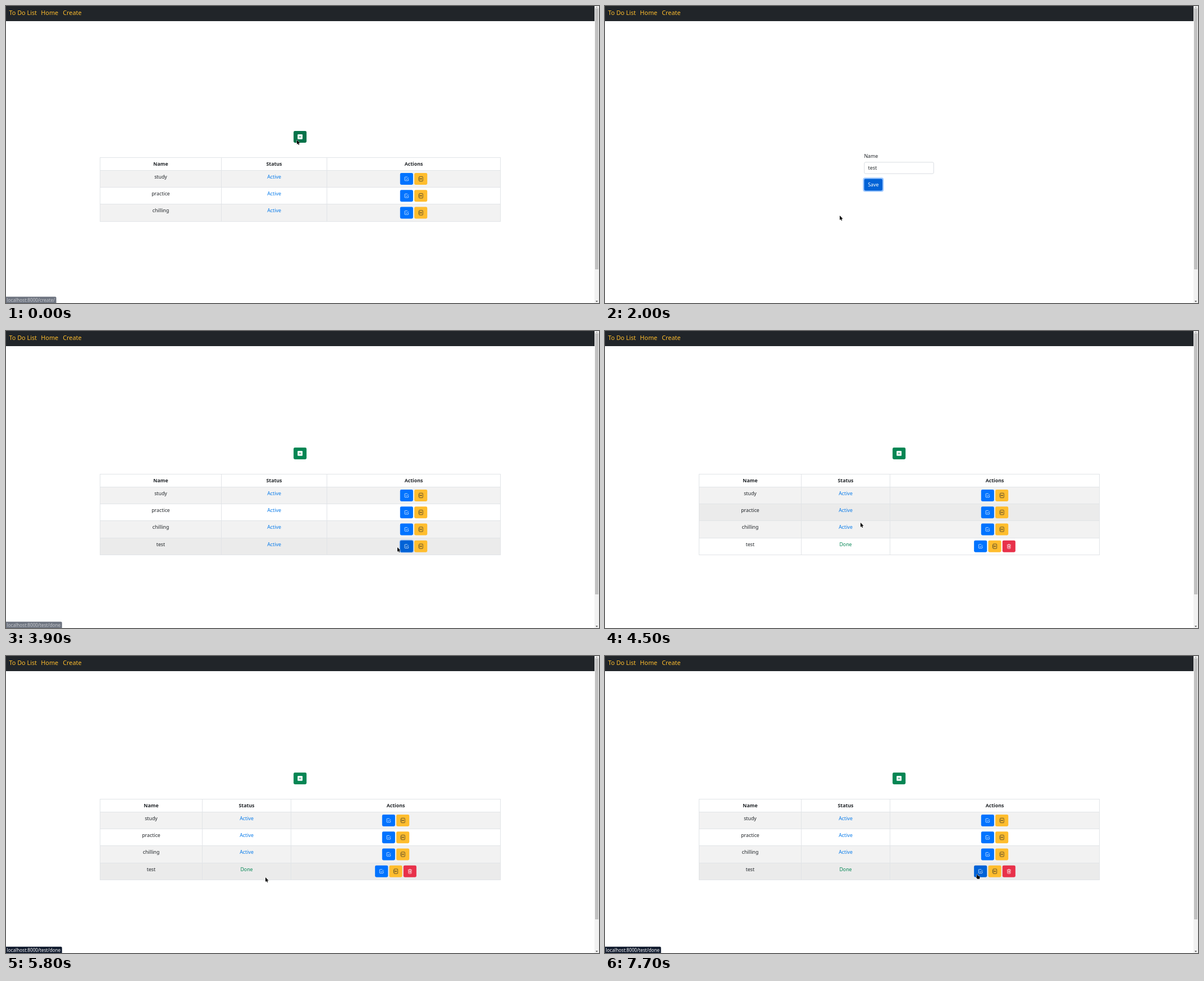
Recreate the animation shown at these times as an HTML page with a canvas. Size 1056 by 530 pixels, loop 8000 ms.

```html
<!DOCTYPE html>
<html lang="en">
<head>
<meta charset="utf-8">
<title>To Do List</title>
<style>
html, body { margin: 0; width: 100%; height: 100%; overflow: hidden; background: #fff; }
canvas { display: block; width: 1056px; height: 530px; }
</style>
</head>
<body>
<canvas id="stage" width="1056" height="530"></canvas>
<script>
const ctx = document.getElementById('stage').getContext('2d');
const LOOP = 8000;
const FONT = '"Noto Sans", "Open Sans", sans-serif';
const BLUE = '#0073ff', BLUE_DARK = '#0062d6', YELLOW = '#ffbd2e', YELLOW_DARK = '#ffca52';
const GREEN = '#048654', GREEN_DARK = '#05734a', RED = '#e8314a', INK = '#212529', LINE = '#e1e4e7';
const ROW = 30.25, BTN_W = 23.1, BTN_H = 20.9, PITCH = 25.3;

// pointer: time, x, y
const pointer = [
  [0, 518, 239], [200, 520, 234], [300, 521, 233], [500, 530, 215], [600, 538, 170],
  [700, 541, 138], [800, 541, 180], [900, 537, 240], [1000, 532, 284], [1200, 525, 340],
  [1300, 512, 418], [1500, 440, 392], [1600, 418, 374], [2300, 413, 359], [2400, 395, 355],
  [2500, 375, 351], [2800, 400, 372], [2900, 450, 384], [3000, 503, 380], [3200, 590, 376],
  [3300, 680, 374], [3500, 703, 380], [3600, 706, 384], [3700, 707, 385], [3900, 697, 386],
  [4100, 640, 370], [4200, 540, 330], [4300, 457, 312], [4500, 455, 342], [4700, 500, 372],
  [4800, 590, 385], [5000, 701, 390], [5200, 699, 391], [5400, 668, 389], [5600, 537, 388],
  [5800, 462, 395], [6000, 480, 390], [6100, 540, 383], [6200, 600, 380], [6300, 631, 393],
  [6600, 669, 387], [6800, 690, 384], [6900, 691, 386], [7100, 688, 386], [7300, 672, 388],
  [7400, 668, 389], [7500, 663, 388], [7700, 661, 389]
];

// link preview: time, opacity, path
const previews = [
  [0, .6, 'create/'], [200, 1, 'create/'], [600, .5, 'create/'], [700, 0, ''],
  [3900, .6, 'test/done'], [4100, 1, 'test/done'], [4200, .5, 'test/done'], [4300, 0, ''],
  [5000, .6, 'update/test'], [5200, 1, 'update/test'], [5400, 1, 'test/done'],
  [6000, .7, 'test/done'], [6100, .4, 'test/done'], [6200, 0, ''],
  [6800, .6, 'update/test'], [6900, 1, 'update/test'], [7300, 1, 'test/done']
];

const at = (list, t) => list.reduce((found, item) => item[0] <= t ? item : found);
const within = (t, a, b) => t >= a && t < b;

function rect(x, y, w, h, color) {
  ctx.fillStyle = color;
  ctx.fillRect(x, y, w, h);
}

function box(x, y, w, h, r, fill, stroke) {
  ctx.beginPath();
  ctx.roundRect(x, y, w, h, r);
  if (fill) { ctx.fillStyle = fill; ctx.fill(); }
  if (stroke) { ctx.strokeStyle = stroke; ctx.stroke(); }
}

function text(str, x, y, { size = 8.8, color = INK, align = 'left', weight = 400 } = {}) {
  ctx.font = `${weight} ${size}px ${FONT}`;
  ctx.textAlign = align;
  ctx.fillStyle = color;
  ctx.fillText(str, x, y);
}

// Icons live on a 16 unit grid
const icons = {
  plus() {
    box(0, 0, 16, 16, 2, '#fff');
    rect(7.4, 4, 1.2, 8, GREEN);
    rect(4, 7.4, 8, 1.2, GREEN);
  },
  check() {
    ctx.strokeStyle = '#fff';
    ctx.stroke(new Path2D('M11 2H3.2Q2 2 2 3.2V12.8Q2 14 3.2 14H12.8Q14 14 14 12.8V8M5 7.6L8 10.6L14.8 3.8'));
  },
  journal() {
    ctx.strokeStyle = INK;
    box(2.5, .5, 12, 15, 1.5, null, INK);
    ctx.stroke(new Path2D('M8.5 5V11M5.5 8H11.5M1 5H3.5M1 8H3.5M1 11H3.5'));
  },
  trash() {
    ctx.strokeStyle = '#fff';
    ctx.stroke(new Path2D('M1.5 3.5H14.5M5.5 3V1.5H10.5V3M3.2 4V14Q3.2 15.4 4.6 15.4H11.4Q12.8 15.4 12.8 14V4M5.7 6V12.8M8 6V12.8M10.3 6V12.8'));
  }
};

function button(x, y, color, icon) {
  box(x, y, BTN_W, BTN_H, 2.4, color);
  ctx.save();
  ctx.translate(x + BTN_W / 2 - 4.4, y + BTN_H / 2 - 4.4);
  ctx.scale(.55, .55);
  ctx.lineWidth = 1.25;
  icons[icon]();
  ctx.restore();
}

function ring(x, y, w, h, alpha) {
  box(x - 2.2, y - 2.2, w + 4.4, h + 4.4, 4, `rgba(20,120,255,${alpha})`);
}

function chrome() {
  rect(0, 0, 1048, 27, INK);
  const nav = { size: 10.85, color: '#fdbc2d' };
  text('To Do List', 5.5, 16.2, nav);
  text('Home', 62.3, 16.2, nav);
  text('Create', 101.2, 16.2, nav);
  rect(1048, 0, 8, 530, '#f1f1f1');
  rect(1049, 4, 6, 466, '#c1c1c1');
  ctx.fillStyle = '#a3a3a3';
  ctx.fill(new Path2D('M1050 3L1052 1L1054 3Z'));
  ctx.fillStyle = '#505050';
  ctx.fill(new Path2D('M1050 526L1054 526L1052 528.5Z'));
}

function listPage(t, py) {
  const names = ['study', 'practice', 'chilling'];
  if (t >= 2300) names.push('test');
  const done = t >= 4200;
  const top = names.length === 3 ? 270.4 : 255.4;
  const cols = done ? [167, 349, 507, 880] : [167, 383, 571, 880];
  const mid = [0, 1, 2].map(i => (cols[i] + cols[i + 1] + 1) / 2);
  const first = top + 22.9;
  const bottom = first + names.length * ROW;
  const hoverRow = t >= 4500 && t < 4700 ? 1 : Math.floor((py - first) / ROW);

  button(512.1, top - 47.4, t < 500 ? GREEN_DARK : GREEN, 'plus');
  ['Name', 'Status', 'Actions'].forEach((head, i) =>
    text(head, mid[i], top + 14.8, { align: 'center', weight: 700 }));

  names.forEach((name, i) => {
    const y = first + i * ROW;
    const shade = i === hoverRow ? '#ebebeb' : i % 2 ? '#fff' : '#f2f2f2';
    rect(167, y, 714, ROW, shade);
  });
  for (let i = 0; i <= names.length; i++)
    rect(167, Math.round(first + i * ROW - .4), 714, 1, LINE);
  rect(167, Math.floor(top), 714, 1, LINE);
  cols.forEach(x => rect(x, Math.floor(top), 1, bottom - Math.floor(top), LINE));

  names.forEach((name, i) => {
    const y = first + i * ROW;
    const last = i === 3, finished = last && done;
    text(name, mid[0], y + 14.5, { align: 'center' });
    text(finished ? 'Done' : 'Active', mid[1], y + 14.5,
      { align: 'center', color: finished ? GREEN : '#087bea' });
    const count = finished ? 3 : 2;
    const x = mid[2] - (BTN_W + (count - 1) * PITCH) / 2;
    const overCheck = last && (within(t, 3500, 4200) || within(t, 5400, 5600) || t >= 7300);
    const overEdit = last && (within(t, 5000, 5400) || within(t, 6800, 7300));
    if (last && within(t, 3900, 4200)) ring(x + 1, y + 5.7, BTN_W - 2, BTN_H - 2, .4);
    button(x, y + 4.7, overCheck ? BLUE_DARK : BLUE, 'check');
    button(x + PITCH, y + 4.7, overEdit ? YELLOW_DARK : YELLOW, 'journal');
    if (finished) button(x + 2 * PITCH, y + 4.7, RED, 'trash');
  });
}

function createPage(t) {
  const focused = within(t, 1100, 1900), saving = t >= 1900;
  const typed = 'test'.slice(0, Math.max(0, Math.floor((t - 1400) / 100)));
  text('Name', 461.4, 270.9);
  if (focused) ring(461.5, 278.5, 124, 20.9, t < 1200 ? .15 : .28);
  ctx.lineWidth = .8;
  box(461.8, 278.8, 123.5, 20.4, 2.2, '#fff', focused ? '#86b7fe' : '#ced4da');
  text(typed, 468.6, 292.2);
  if (focused) rect(469 + ctx.measureText(typed).width, 284.3, .6, 9.5, INK);
  if (saving) ring(461.5, 308.5, 32.6, 20.9, .42);
  box(461.5, 308.5, 32.6, 20.9, 2.4, saving ? BLUE_DARK : BLUE);
  text('Save', 477.8, 322.1, { color: '#fff', align: 'center' });
}

function preview(t) {
  const [, alpha, path] = at(previews, t);
  if (!alpha) return;
  const url = 'localhost:8000/' + path;
  ctx.globalAlpha = alpha;
  ctx.font = `8.2px ${FONT}`;
  const w = ctx.measureText(url).width + 4;
  box(-2, 518.8, w + 2, 13, 2, '#101a2d');
  text(url, 1.5, 527.6, { size: 8.2, color: '#fff' });
  ctx.globalAlpha = 1;
}

const arrow = new Path2D('M0 0V7.9L1.8 6.3L3 9.1L4.3 8.5L3.1 5.8H5.6Z');
const hand = new Path2D('M1.2 .5Q2.3 0 2.6 1.2V3.2L5.6 3.8Q6.6 4.2 6.5 5.3L6 8.8H2L.2 6.2Q-.2 5.2 .9 5.3Z');
const beam = new Path2D('M0 0H1.4M2.2 0H3.6M1.8 .3V8.2M0 8.5H1.4M2.2 8.5H3.6');

function drawPointer(t, x, y) {
  const onLink = within(t, 200, 500) || within(t, 3500, 3900) || within(t, 5000, 5600) || t >= 6600;
  ctx.save();
  ctx.translate(x, y);
  ctx.lineJoin = 'round';
  if (within(t, 1000, 1200)) {
    ctx.lineWidth = .8;
    ctx.strokeStyle = '#000';
    ctx.stroke(beam);
  } else {
    const shape = onLink ? hand : arrow;
    ctx.lineWidth = .9;
    ctx.strokeStyle = '#fff';
    ctx.stroke(shape);
    ctx.fillStyle = '#000';
    ctx.fill(shape);
  }
  ctx.restore();
}

function draw(now) {
  const t = Math.floor(now % LOOP / 100) * 100;
  const [, x, y] = at(pointer, t);
  rect(0, 0, 1056, 530, '#fff');
  if (!within(t, 2200, 2300)) {
    chrome();
    if (within(t, 500, 2200)) createPage(t);
    else listPage(t, y);
    preview(t);
  }
  drawPointer(t, x, y);
}

let start;
function frame(now) {
  start ??= now;
  draw(now - start);
  requestAnimationFrame(frame);
}
draw(0);
requestAnimationFrame(frame);
</script>
</body>
</html>
```
